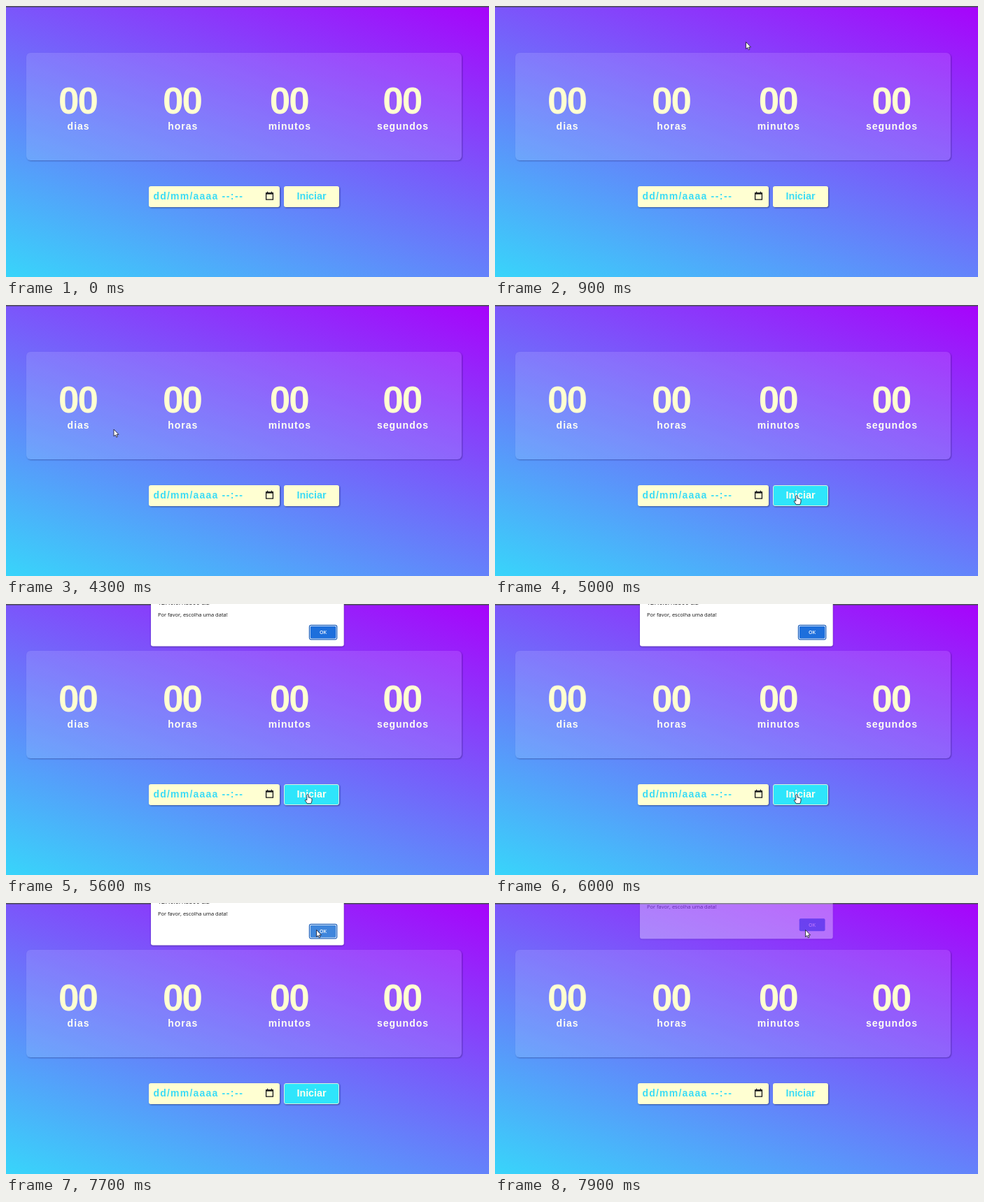
Animation of 690x388 px, one loop 8 s. Source, as an HTML page:

```html
<!DOCTYPE html>
<html lang="pt">
<head>
<meta charset="utf-8">
<title>Contagem regressiva</title>
<style>
  html, body { margin: 0; width: 100%; height: 100%; overflow: hidden; }
  body { background: linear-gradient(20deg, #38d5fa, #a703fb); }
  div { position: absolute; box-sizing: border-box; }
  svg { position: absolute; inset: 0; width: 690px; height: 388px; font-family: "Liberation Sans", Arial, sans-serif; font-weight: 700; }
  .strip { left: 0; top: 0; width: 690px; height: 1px; background: #55545f; box-shadow: 0 1px rgba(70, 66, 95, .7); }
  .panel { left: 29px; top: 67px; width: 622px; height: 154px; border-radius: 6px;
    background: rgba(255, 255, 255, .12); box-shadow: 1px 1px 2px rgba(20, 10, 70, .35); }
  .field, .button { top: 257.5px; height: 30px; border-radius: 3px; background: #ffffd2; box-shadow: 1px 1px 2px rgba(10, 10, 60, .5); }
  .field { left: 204px; width: 187px; }
  .button { left: 396.5px; width: 79px; }
  .hover .button { background: #2ee5fb; border: 1px solid #d9f3df; }
  .count { font-size: 53px; letter-spacing: -2px; fill: #ffffd2; text-anchor: middle; }
  .label { font-size: 14px; letter-spacing: 1px; fill: #fffff4; text-anchor: middle; }
  .hint { font-size: 14px; fill: #3cdcf5; }
  #start { font-size: 14.3px; fill: #3cdcf5; text-anchor: middle; }
  .hover #start { fill: #fdfff0; }
  #dialog { font-family: "Open Sans", "Noto Sans", sans-serif; font-weight: 400; fill: #111;
    filter: drop-shadow(0 1px 1px rgba(20, 10, 60, .4)); }
  .ok { fill: #1d6fdc; }
  .ok-hover .ok { fill: #3f86dc; }
  .closing .ring { visibility: hidden; }
  #arrow, #hand { fill: #fff; stroke: #25253a; stroke-width: .9; stroke-linejoin: round; }
</style>
</head>
<body>
<div class="strip"></div>
<div class="panel"></div>
<div class="field"></div>
<div class="button"></div>
<svg viewBox="0 0 690 388">
  <g id="counters"></g>
  <text class="hint" x="210.5" y="277" letter-spacing="1.2">dd/mm/aaaa</text>
  <text class="hint" x="308.5" y="277" letter-spacing="1.5">--:--</text>
  <g fill="none" stroke="#16161c">
    <path d="M371.6 267.8h9.8v9.4h-9.8z" stroke-width="1.3"/>
    <path d="M371 268.5h11" stroke-width="2.2"/>
    <path d="M373.6 265.8v2M379.4 265.8v2" stroke-width="1.3"/>
  </g>
  <text id="start" x="436.5" y="277">Iniciar</text>

  <g id="dialog">
    <rect x="207" y="-10" width="275.7" height="70.5" rx="3" fill="#fff"/>
    <text x="217" y=".8" font-size="8.8">127.0.0.1:5500 diz</text>
    <text x="217" y="17.5" font-size="7.5">Por favor, escolha uma data!</text>
    <rect class="ring" x="433.4" y="30.4" width="39.4" height="20.4" rx="2.5" fill="#fff" stroke="#2465bd" stroke-width="1.2"/>
    <rect class="ok" x="434.7" y="31.7" width="36.8" height="17.8" rx="1.8"/>
    <text x="453" y="43.3" font-size="7" font-weight="600" fill="#fff" text-anchor="middle">OK</text>
  </g>

  <path id="arrow" d="M0 0V10L2.3 8L3.8 11.3L5.4 10.6L4 7.4H7Z"/>
  <path id="hand" d="M-1.2 .8Q0 -.8 1.2 .8V4.6Q2.2 3.8 3 5Q4 4.3 4.6 5.5Q5.8 5 6 6.4V9.5L4.8 13.2H-.8L-3.8 8.6Q-3.6 6.8 -1.2 8.4Z"/>
</svg>
<script>
const LOOP = 8000, STEP = 100;
const OPEN = 5200, CLOSE = 7700;
const $ = id => document.getElementById(id);

const units = { dias: 103.4, horas: 252.6, minutos: 405.2, segundos: 566.8 };
$("counters").innerHTML = Object.entries(units).map(([name, x]) =>
  `<text class="count" x="${x - 1}" y="153.6">00</text><text class="label" x="${x + .2}" y="176.7">${name}</text>`).join("");

const entry = { x: 430, y: -16 };
const moves = [
  { start: 500, time: 100, x: 430, y: 2 },
  { start: 600, time: 100, x: 272, y: 24 },
  { start: 700, time: 200, x: 358.5, y: 51.5 },
  { start: 1900, time: 100, x: 562.5, y: 380 },
  { start: 3300, time: 500, x: 276, y: 270 },
  { start: 4000, time: 300, x: 154, y: 178 },
  { start: 4300, time: 600, x: 431, y: 272.5 },
  { start: 6100, time: 500, x: 265, y: 18 },
  { start: 6900, time: 500, x: 443.5, y: 38.5 }
];

const clamp = v => Math.min(1, Math.max(0, v));
const ease = v => v * v * (3 - 2 * v);
const inside = (p, x, y, w, h) => p.x >= x && p.x <= x + w && p.y >= y && p.y <= y + h;

// Each move pulls the pointer from wherever the earlier ones left it.
function pointerAt(t) {
  return moves.reduce((p, m) => {
    const k = ease(clamp((t - m.start) / m.time));
    return { x: p.x + (m.x - p.x) * k, y: p.y + (m.y - p.y) * k };
  }, entry);
}

function draw(t) {
  const tip = pointerAt(t);
  const onButton = inside(tip, 397, 258, 79, 30);
  const closing = t > CLOSE;
  for (const id of ["arrow", "hand"]) {
    $(id).setAttribute("visibility", (id === "hand") === onButton ? "visible" : "hidden");
    $(id).setAttribute("transform", `translate(${tip.x} ${tip.y})`);
  }

  const shown = clamp((t - OPEN) / 200) * clamp(1 - (t - CLOSE) / 300);
  $("dialog").style.opacity = shown;
  $("dialog").setAttribute("transform", `translate(0 ${-14 * (1 - shown)})`);

  const state = document.body.classList;
  state.toggle("hover", onButton || (t > OPEN && t < CLOSE + 200));
  state.toggle("ok-hover", !closing && inside(tip, 433, 30, 40, 21));
  state.toggle("closing", closing);
}

const begin = performance.now();
function tick() {
  const t = (performance.now() - begin) % LOOP;
  draw(Math.floor(t / STEP) * STEP);
  requestAnimationFrame(tick);
}
tick();
</script>
</body>
</html>
```
